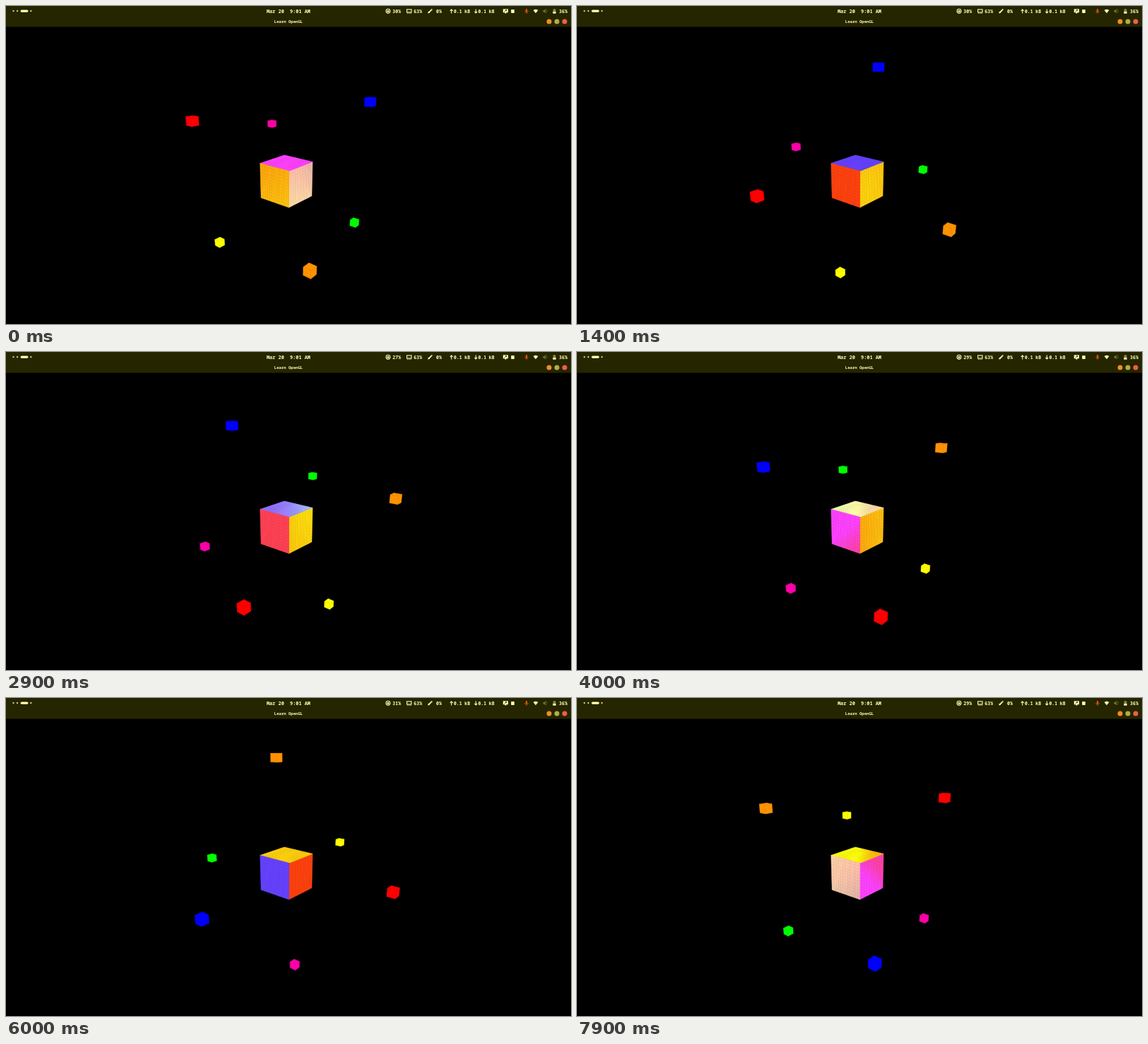
These frames come from a looping animation (800 by 450 pixels, 8000 ms). An HTML page with a canvas:

```html
<!DOCTYPE html>
<html lang="en">
<head>
<meta charset="utf-8">
<title>Learn OpenGL</title>
<style>
  html, body { margin: 0; width: 100%; height: 100%; overflow: hidden; background: #000; }
  canvas, svg { position: absolute; left: 0; top: 0; width: 800px; height: 450px; }
  text { font: bold 6.6px "Noto Sans Mono", "DejaVu Sans Mono", monospace; white-space: pre; }
</style>
</head>
<body>
<canvas id="scene" width="800" height="450"></canvas>
<svg viewBox="0 0 800 450" fill="#ffffb4">
  <rect width="800" height="29.5" fill="#252500"/>
  <g>
    <circle cx="10.5" cy="7" r="1.2" opacity=".75"/>
    <circle cx="16" cy="7" r="1.2" opacity=".75"/>
    <rect x="20.5" y="5.4" width="11" height="3.4" rx="1.7"/>
    <circle cx="35.3" cy="7" r="1.2" opacity=".75"/>
  </g>
  <text x="400" y="9.6" text-anchor="middle" style="font-size:6.9px">Mar 20  9:01 AM</text>
  <text x="400" y="24.2" text-anchor="middle" style="font-size:5.6px">Learn OpenGL</text>

  <g fill="none" stroke="#ffffb4">
    <circle cx="541" cy="7.2" r="2.9" stroke-width="1.1"/>
    <rect x="567.6" y="4.9" width="6.4" height="4" stroke-width="1.1"/>
    <path d="M568 10.2h6" stroke-dasharray="1 .7"/>
    <path d="M598.5 9.3l4-4" stroke-width="1.8"/>
    <path d="M630.7 10.5v-5.5M628.7 7l2-2.2 2 2.2M665.3 4.4v5.5M663.3 7.8l2 2.2 2-2.2" stroke-width="1.1"/>
  </g>
  <circle cx="541" cy="7.2" r="1.5"/>
  <path d="M597.8 7.6l2.2 2.2-2.6.6zM601.6 4.2h2v2z"/>
  <text id="cpu" x="547.3" y="9.7"></text>
  <text x="577.3" y="9.7">63%</text>
  <text x="609" y="9.7">0%</text>
  <text id="up" x="634" y="9.7" style="font-size:6.4px"></text>
  <text id="down" x="668.5" y="9.7" style="font-size:6.4px"></text>

  <path d="M703.8 4.2h7.2v5h-2.6v1.3h-2v-1.3h-2.6z"/>
  <path d="M705.6 8l3-2.2M707 5.4h1.8v1.7" fill="none" stroke="#252500" stroke-width=".8"/>
  <rect x="715.2" y="5" width="4.6" height="4.9" rx=".6"/>
  <g fill="none" stroke="#ed5b00">
    <path d="M737 5v2.4" stroke-width="2.2" stroke-linecap="round"/>
    <path d="M734.7 7a2.3 2.3 0 0 0 4.6 0M737 9.3v1.5" stroke-width=".8"/>
  </g>
  <path d="M746.6 6q3.4-2.4 6.8 0l-3.4 4.2z"/>
  <g opacity=".35">
    <path d="M760.4 6h1.4l2-1.8v6l-2-1.8h-1.4z"/>
    <path d="M764.8 4.3q2.5 2.8 0 5.6" fill="none" stroke="#ffffb4" stroke-width=".8"/>
  </g>
  <path d="M775.5 4h2v.8h.9v5.7h-3.8v-5.7h.9z" opacity=".45"/>
  <path d="M774.4 8h4.2v2.6h-4.2z"/>
  <text x="783" y="9.7">36%</text>

  <circle cx="769" cy="22" r="3.5" fill="#ee8f20"/>
  <circle cx="780" cy="22" r="3.5" fill="#b0ae45"/>
  <circle cx="791" cy="22" r="3.5" fill="#ee5f48"/>
</svg>
<script>
const LOOP = 8000, STEP = 100, FOCAL = 508, CELLS = 12;
const ctx = document.getElementById('scene').getContext('2d');

// World axes and origin seen from the camera: right, down, forward.
const AXES = [[.769, .214, -.602], [0, -.942, -.335], [-.639, .258, -.725]];
const ORIGIN = [-.054, .13, 9.8];

const dot = (a, b) => a[0] * b[0] + a[1] * b[1] + a[2] * b[2];
const sub = (a, b) => a.map((v, i) => v - b[i]);
const unit = a => a.map(v => v / Math.hypot(...a));
const clamp = (v, lo, hi) => Math.min(hi, Math.max(lo, v));
const EYE = AXES.map(axis => -dot(axis, ORIGIN));

// Orbits run about the (1,1,1) diagonal, on either side of the big cube.
const LIGHTS = [
  { color: [255, 0, 0], phase: 0, side: 1 },
  { color: [0, 0, 255], phase: 240, side: 1 },
  { color: [255, 146, 0], phase: 120, side: 1 },
  { color: [255, 0, 170], phase: 120, side: -1 },
  { color: [0, 255, 0], phase: 0, side: -1 },
  { color: [255, 255, 0], phase: 240, side: -1 }
];

function orbit({ phase, side }, t) {
  const angle = 185.7 + phase + t * .03;
  return [0, -120, 120].map(d => side * (1 + 2 * Math.cos((angle + d) * Math.PI / 180)));
}

function project(p) {
  const [x, y, z] = ORIGIN.map((o, i) => o + p[0] * AXES[0][i] + p[1] * AXES[1][i] + p[2] * AXES[2][i]);
  return [400 + FOCAL * x / z, 239.5 + FOCAL * y / z];
}

// Point on the positive face of an axis; u and v run from -1 to 1.
function facePoint(center, half, axis, u, v) {
  const p = [...center];
  p[axis] += half;
  p[(axis + 1) % 3] += half * u;
  p[(axis + 2) % 3] += half * v;
  return p;
}

function quad(center, half, axis, u0, v0, u1, v1, color, seam) {
  ctx.beginPath();
  for (const [u, v] of [[u0, v0], [u1, v0], [u1, v1], [u0, v1]])
    ctx.lineTo(...project(facePoint(center, half, axis, u, v)));
  ctx.closePath();
  ctx.fillStyle = ctx.strokeStyle = `rgb(${color.map(Math.round)})`;
  ctx.lineWidth = seam;
  ctx.fill();
  ctx.stroke();
}

// The display has only four levels of blue.
function coarseBlue(b) {
  const n = Math.floor(b / 85), part = b / 85 - n;
  return Math.min(255, 85 * (n + clamp((part - .58) * 4 + .5, 0, 1)));
}

// Phong: ambient 0.1, diffuse 1, specular 0.5 with exponent 32.
function shade(p, axis, lights) {
  const view = unit(sub(EYE, p)), sum = [0, 0, 0];
  for (const { color, pos } of lights) {
    const dir = unit(sub(pos, p));
    const mirror = dir.map((v, i) => i === axis ? v : -v);
    const level = .1 + Math.max(0, dir[axis]) + .5 * Math.max(0, dot(mirror, view)) ** 32;
    color.forEach((c, i) => sum[i] += c * level);
  }
  const [r, g, b] = sum.map(v => Math.min(255, v));
  return [r, g, coarseBlue(b)];
}

function drawBigCube(lights) {
  const size = 2 / CELLS;
  for (let axis = 0; axis < 3; axis++)
    for (let i = 0; i < CELLS; i++)
      for (let j = 0; j < CELLS; j++) {
        const u = -1 + i * size, v = -1 + j * size;
        const mid = facePoint([0, 0, 0], .5, axis, u + size / 2, v + size / 2);
        quad([0, 0, 0], .5, axis, u, v, u + size, v + size, shade(mid, axis, lights), .5);
      }
}

// [start, cpu, network rate]
const STATS = [[0, 30, .1], [1900, 27, .1], [3000, 29, .1], [4600, 28, .6], [5200, 31, .1], [6700, 29, .1]];

function showStats(t) {
  const [, cpu, rate] = STATS.findLast(s => s[0] <= t);
  const set = (id, text) => document.getElementById(id).textContent = text;
  set('cpu', cpu + '%');
  set('up', rate + ' kB');
  set('down', rate + ' kB');
}

function draw(t) {
  ctx.clearRect(0, 0, 800, 450);
  const lights = LIGHTS.map(l => ({ ...l, pos: orbit(l, t) }));
  const drawLight = l => {
    for (let axis = 0; axis < 3; axis++) quad(l.pos, .1, axis, -1, -1, 1, 1, l.color, .5);
  };
  lights.filter(l => l.side < 0).forEach(drawLight);
  drawBigCube(lights);
  lights.filter(l => l.side > 0).forEach(drawLight);
  showStats(t);
}

const start = performance.now();
function tick() {
  const t = (performance.now() - start) % LOOP;
  draw(Math.floor(t / STEP) * STEP);
  requestAnimationFrame(tick);
}
tick();
</script>
</body>
</html>
```
